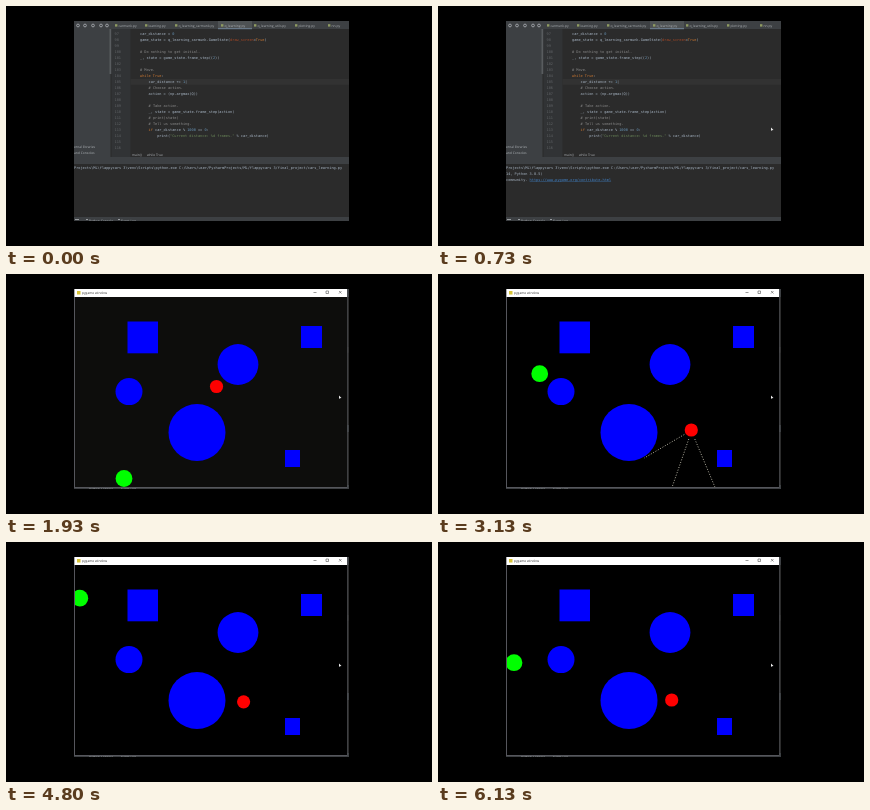
An HTML page for the animation above (6.19 s loop, 426 by 240 pixels).

```html
<!DOCTYPE html>
<html lang="en">
<head>
<meta charset="utf-8">
<title>Driving agent</title>
<style>
  html, body { margin: 0; width: 100%; height: 100%; overflow: hidden; background: #000; }
  svg { display: block; width: 100vw; height: 100vh; }
  text { white-space: pre; text-rendering: geometricPrecision; }
  .mono { font: 3.57px "DejaVu Sans Mono", monospace; fill: #a9b7c6; }
  .ui { font: 3.3px "Open Sans", Arial, sans-serif; fill: #aeb2b6; }
  .comment { fill: #8c8c8c; }
  .key { fill: #cc7832; }
  .arg { fill: #aa4926; }
  .num { fill: #6897bb; }
  .str { fill: #6a8759; }
  .link { fill: #3f7fc4; text-decoration: underline; }
  .bar { fill: #3d4043; }
</style>
</head>
<body>
<svg viewBox="0 0 426 240">
  <defs>
    <clipPath id="screen"><rect x="68" y="15" width="275" height="200"/></clipPath>
    <clipPath id="arena"><rect x="69" y="22" width="272" height="191"/></clipPath>
  </defs>
  <rect width="426" height="240" fill="#000"/>

  <g clip-path="url(#screen)">
    <g id="editor">
      <rect x="68" y="15" width="275" height="200" fill="#2b2b2b"/>
      <rect class="bar" x="68" y="15" width="275" height="8"/>
      <rect class="bar" x="68" y="23" width="36.5" height="128"/>
      <rect x="103.5" y="23" width="2" height="45" fill="#595c5f"/>
      <rect x="105.5" y="23" width="19" height="128" fill="#313335"/>
      <rect x="124.5" y="73" width="218.5" height="5.8" fill="#323232"/>
      <rect x="212" y="15" width="34" height="8" fill="#4e5254"/>
      <rect x="212" y="22.2" width="34" height="1" fill="#6f8296"/>
      <g id="tools" fill="none" stroke="#aeb2b6" stroke-width=".8"></g>
      <g id="tabs"></g>
      <g id="code"></g>
      <text class="ui" x="68" y="142">ernal libraries</text>
      <text class="ui" x="68" y="148">and Consoles</text>
      <text class="ui" x="126" y="149.5">main()</text>
      <text class="ui" x="141" y="149.5">while True</text>
      <rect class="bar" x="68" y="151" width="275" height="7"/>
      <text class="mono" x="68" y="162.5">Projects\ML\flappycars 3\venv\Scripts\python.exe C:/Users/user/PycharmProjects/ML/flappycars 3/final_project/cars_learning.py</text>
      <g id="greeting">
        <text class="mono" x="68" y="168.5">14, Python 3.8.5)</text>
        <text class="mono" x="68" y="174.5">community. <tspan class="link">https://www.pygame.org/contribute.html</tspan></text>
      </g>
      <rect class="bar" x="68" y="211" width="275" height="4"/>
      <text class="ui" x="83" y="215.5">Python Console</text>
      <text class="ui" x="115" y="215.5">Event Log</text>
      <path d="M69 213.5h4M80 213.5h2M112 213.5h2" stroke="#9a9da0"/>
    </g>

    <g id="game">
      <rect x="68" y="15" width="273.5" height="199" fill="#55565c"/>
      <rect id="floor" x="69" y="23" width="272" height="190"/>
      <rect x="68.5" y="15" width="272.5" height="8" fill="#fff"/>
      <rect x="71" y="17" width="3.5" height="3.5" fill="#d8c438"/>
      <text class="ui" x="76" y="19.8" style="fill:#333">pygame window</text>
      <path d="M307.5 18.5h3M320 17h2.5v2.5h-2.5zM333 17l2.5 2.5m0-2.5l-2.5 2.5" fill="none" stroke="#555" stroke-width=".6"/>
      <g clip-path="url(#arena)">
        <g fill="#00f">
          <rect x="121.5" y="47.5" width="30.5" height="31.8"/>
          <rect x="295" y="52" width="21" height="22"/>
          <rect x="279" y="176" width="15" height="17"/>
          <circle cx="232" cy="90.5" r="20.4"/>
          <circle cx="123" cy="117.6" r="13.5"/>
          <circle cx="191" cy="158.5" r="28.5"/>
        </g>
        <circle id="cat" r="8.4" fill="#0f0"/>
        <g id="car">
          <path id="arms" d="M-7 4.5L-47 28M-2.5 9L-19.5 58M3.5 9L24 58" fill="none" stroke="#c8c5b4" stroke-width=".9" stroke-dasharray="1 1.7"/>
          <circle r="6.6" fill="#f00"/>
        </g>
      </g>
    </g>
    <path id="pointer" d="M333 121.5v3.6l.9-.8 1.6-.2z" fill="#eee"/>
  </g>
</svg>
<script>
const LOOP = 6190, STEP = 200 / 3, LAST = 92;
const $ = id => document.getElementById(id);

// Each entry: row, indent, markup
const code = [
  [0, 0, 'car_distance = <tspan class="num">0</tspan>'],
  [1, 0, 'game_state = q_learning_carmunk.GameState(<tspan class="arg">draw_screen</tspan>=<tspan class="key">True</tspan>)'],
  [3, 0, '<tspan class="comment"># Do nothing to get initial.</tspan>'],
  [4, 0, '_, state = game_state.frame_step((<tspan class="num">2</tspan>))'],
  [6, 0, '<tspan class="comment"># Move.</tspan>'],
  [7, 0, '<tspan class="key">while True</tspan>:'],
  [8, 4, 'car_distance += <tspan class="num">1</tspan>|'],
  [9, 4, '<tspan class="comment"># Choose action.</tspan>'],
  [10, 4, 'action = (np.argmax(Q))'],
  [12, 4, '<tspan class="comment"># Take action.</tspan>'],
  [13, 4, '_, state = game_state.frame_step(action)'],
  [14, 4, '<tspan class="comment"># print(state)</tspan>'],
  [15, 4, '<tspan class="comment"># Tell us something.</tspan>'],
  [16, 4, '<tspan class="key">if</tspan> car_distance % <tspan class="num">1000</tspan> == <tspan class="num">0</tspan>:'],
  [17, 8, 'print(<tspan class="str">"Current distance: %d frames."</tspan> % car_distance)']
];
const rowY = row => 29.2 + row * 5.97;
const numbers = Array.from({ length: 20 }, (_, i) =>
  `<text class="mono" x="108.5" y="${rowY(i)}" style="fill:#606366">${97 + i}</text>`);
$('code').innerHTML = numbers.join('') + code.map(([row, indent, body]) =>
  `<text class="mono" x="${134 + indent * 2.15}" y="${rowY(row)}">${body}</text>`).join('');

const tabs = [
  [109, 'carmunk.py'], [139, 'learning.py'], [169, 'q_learning_carmunk.py'], [215, 'q_learning.py'],
  [248, 'q_learning_utils.py'], [289, 'plotting.py'], [322, 'nn.py']
];
$('tabs').innerHTML = tabs.map(([x, name]) =>
  `<rect x="${x}" y="18.2" width="2.4" height="2.4" fill="#8f9b62"/><text class="ui" x="${x + 3.5}" y="20.8">${name}</text>`).join('');
$('tools').innerHTML = [72, 79, 87, 95, 101].map(x => `<circle cx="${x}" cy="19.5" r="1.4"/>`).join('');

// Waypoints: step, x, y
const carPath = [[21, 108, 187.3], [25, 148, 125], [29, 210.5, 112.5], [47, 253.3, 156], [72, 237.6, 159.8], [92, 233.7, 158]];
const catPath = [[21, 124, 30.2], [23, 98, 70], [25, 94, 125], [29, 118, 204.5], [38, 94, 145], [47, 101.7, 99.7], [72, 73.8, 56.2], [92, 76, 120.7]];

function along(path, n) {
  if (n <= path[0][0]) return path[0].slice(1);
  const i = Math.max(1, path.findIndex(p => p[0] >= n));
  const [a, x0, y0] = path[i - 1], [b, x1, y1] = path[i];
  const k = (n - a) / (b - a);
  return [x0 + (x1 - x0) * k, y0 + (y1 - y0) * k];
}
const place = (id, [x, y]) => $(id).setAttribute('transform', `translate(${x} ${y})`);
const show = (id, on) => $(id).setAttribute('visibility', on ? 'inherit' : 'hidden');

function draw(n) {
  const playing = n >= 17;
  show('game', playing);
  show('greeting', n >= 8);
  show('pointer', n >= 8);
  show('arms', n >= 46 && n <= 48);
  $('floor').setAttribute('fill', n >= 28 && n <= 30 ? '#0d0d0c' : '#000');
  place('car', along(carPath, n));
  place('cat', along(catPath, n));
}

const start = performance.now();
function tick() {
  const t = (performance.now() - start) % LOOP;
  draw(Math.min(LAST, Math.floor((t + 3.5) / STEP)));
  requestAnimationFrame(tick);
}
tick();
</script>
</body>
</html>
```
